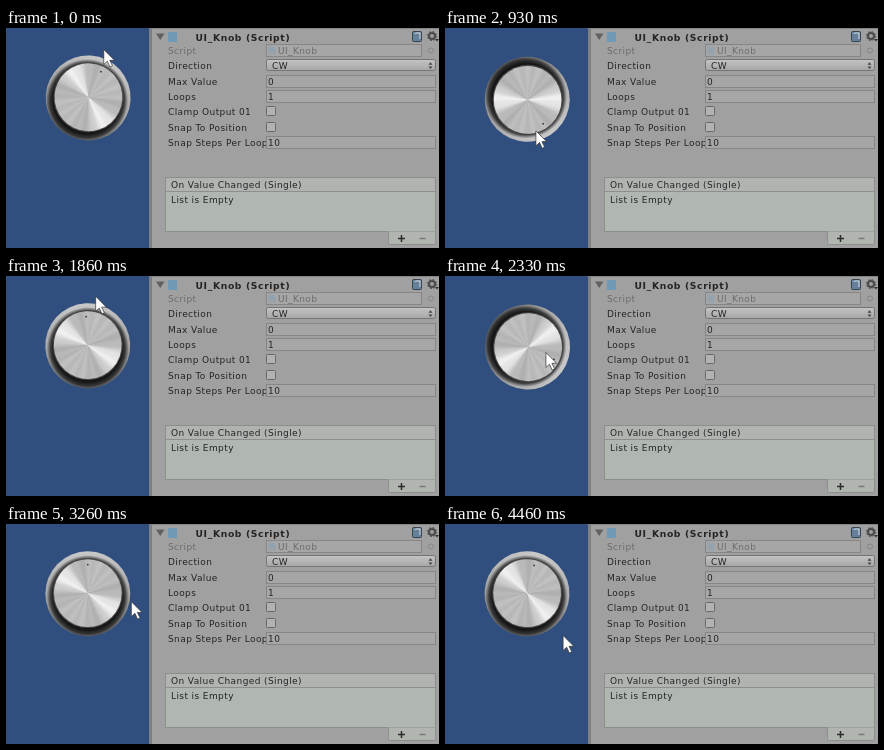
Write an HTML page with a canvas that moves like this. It is 433 px wide and 220 px high and loops after 4530 ms.

```html
<!DOCTYPE html>
<html lang="en">
<head>
<meta charset="utf-8">
<title>UI_Knob</title>
<style>
html, body { margin: 0; width: 433px; height: 220px; overflow: hidden; background: #304f7f; }
svg, canvas { position: absolute; left: 0; top: 0; display: block; }
text { font: 9px "DejaVu Sans", sans-serif; letter-spacing: .4px; fill: #242424; }
.title { font-size: 9.2px; font-weight: bold; letter-spacing: .65px; }
.dim { fill: #6c6c6c; }
.field { fill: #a6a6a6; stroke: #868686; }
.check { fill: #b2b2b2; stroke: #686868; }
.list { fill: #b0b7b0; stroke: #8c908c; }
.head { fill: #b1b3b1; stroke: #8c908c; }
</style>
</head>
<body>
<svg width="433" height="220" viewBox="0 0 433 220">
  <defs>
    <linearGradient id="drop" x2="0" y2="1">
      <stop stop-color="#c4c4c4"/><stop offset="1" stop-color="#a6a6a6"/>
    </linearGradient>
    <clipPath id="labels"><path d="M146 0H260V220H146z"/></clipPath>
  </defs>
  <rect x="143" width="290" height="220" fill="#a0a0a0"/>
  <rect x="143" width="3" height="220" fill="#808080"/>
  <path d="M146 .5H433" stroke="#868686"/>

  <path d="M150 5.500h8.500l-4.300 6.500z" fill="#606060"/>
  <rect x="162" y="4" width="9" height="10" fill="#6f9ab5"/>
  <text class="title" x="189.500" y="13">UI_Knob (Script)</text>
  <rect x="406.500" y="3.500" width="9" height="10" rx="1" fill="#67809a" stroke="#35424f"/>
  <path d="M409 6q0-1 1-1h4v6" fill="none" stroke="#d5dade"/>
  <circle cx="426" cy="8" r="3" fill="none" stroke="#4a4a4a" stroke-width="2"/>
  <circle cx="426" cy="8" r="4.500" fill="none" stroke="#4a4a4a" stroke-dasharray="1.800 1.734"/>
  <path d="M429 11h4l-2 2.500z" fill="#333"/>

  <g id="rows"></g>
  <circle cx="425" cy="22.500" r="2.500" fill="none" stroke="#868686"/>
  <path d="M422.500 36.800h4l-2-2.500zM422.500 38.500h4l-2 2.500z" fill="#444"/>

  <rect class="list" x="159.500" y="149.500" width="270" height="54"/>
  <rect class="head" x="159.500" y="149.500" width="270" height="14"/>
  <text x="165" y="160">On Value Changed (Single)</text>
  <text x="165" y="175">List is Empty</text>
  <path d="M382.500 203.500v11q0 2 2 2h43q2 0 2-2v-11" fill="#b0b5b0" stroke="#8c908c"/>
  <path d="M392 210.500h7m-3.500-3.500v7" stroke="#2c2c2c" stroke-width="1.500"/>
  <path d="M413.500 210.500h6" stroke="#777" stroke-width="1.500"/>
</svg>
<canvas id="stage" width="433" height="220"></canvas>
<script>
const ctx = document.getElementById("stage").getContext("2d");
const LOOP = 4530, STEPS = 68, RAD = Math.PI / 180;

// Inspector rows: label, kind, value
const rows = [
  ["Script", "object", "UI_Knob"], ["Direction", "menu", "CW"],
  ["Max Value", "field", "0"], ["Loops", "field", "1"],
  ["Clamp Output 01", "check"], ["Snap To Position", "check"],
  ["Snap Steps Per Loop", "field", "10"]
];

const box = (y, w, h, look) => `<rect x="260.5" y="${y}" width="${w}" height="${h}" ${look}/>`;
const controls = {
  object: y => box(y - 9.5, 155, 12, 'class="field"') +
    `<rect x="262.5" y="${y - 7.5}" width="7" height="8" fill="#94a3ad"/>`,
  menu: y => box(y - 9.5, 169, 11, 'rx="2" fill="url(#drop)" stroke="#747474"'),
  field: y => box(y - 9.5, 169, 12, 'class="field"'),
  check: y => box(y - 8.5, 9, 9, 'rx="1" class="check"')
};
const indent = { object: 272, menu: 266, field: 262 };

document.getElementById("rows").innerHTML = rows.map(([label, kind, value], i) => {
  const y = Math.round(26 + i * 15.35), dim = kind === "object" ? 'class="dim"' : "";
  const text = value ? `<text ${dim} x="${indent[kind]}" y="${y}">${value}</text>` : "";
  return `<text ${dim} clip-path="url(#labels)" x="162" y="${y}">${label}</text>` +
    controls[kind](y) + text;
}).join("");

// Stops of the drag: arrive and leave step, knob angle, pointer angle and radius
const stops = [
  [0, 0, 26, 18, 51], [5, 8, 77, 108, 34], [23, 23, 252, 250, 34],
  [31, 33, 420, 440, 60], [35, 35, 475, 469, 20], [43, 43, 695, 779, 56],
  [49, 52, 720, 820, 44], [56, 57, 746, 937, 67], [61, 65, 752, 985, 68],
  [67, 67, 734, 859, 55]
];

function poseAt(step) {
  const i = Math.max(1, stops.findIndex(s => s[1] >= step));
  const a = stops[i - 1], b = stops[i];
  const u = Math.min(1, (step - a[1]) / (b[0] - a[1]));
  return a.map((v, j) => v + (b[j] - v) * u).slice(2);
}

function disc(y, r, fill) {
  ctx.beginPath();
  ctx.arc(0, y, r, 0, 2 * Math.PI);
  ctx.fillStyle = fill;
  ctx.fill();
}

function shade(gradient, ...colors) {
  colors.forEach((c, i) => gradient.addColorStop(i / (colors.length - 1), c));
  return gradient;
}

const rim = shade(ctx.createLinearGradient(0, -43, 0, 43), "#c8c8c8", "#a4a4a4", "#646464");
const shadow = shade(ctx.createRadialGradient(0, 1.5, 34, 0, 1.5, 41),
  "rgba(22,22,22,1)", "rgba(30,30,30,.75)", "rgba(40,40,40,0)");

// Brushed metal: two broad opposite highlights plus finer streaks
const metal = ctx.createConicGradient(33 * RAD, 0, -1.5);
for (let i = 0; i <= 120; i++) {
  const a = i * 3 * RAD;
  const glow = 60 * Math.cos(a) ** 6 + 24 * Math.sin(a) ** 8;
  const streak = 7 * Math.cos(6 * a) + 5 * Math.sin(17 * a);
  const v = Math.round(170 + glow + streak);
  metal.addColorStop(i / 120, `rgb(${v},${v},${v})`);
}

function drawKnob(angle) {
  ctx.save();
  ctx.translate(81.8, 70.6);
  ctx.rotate(angle * RAD);
  disc(-0.8, 42.5, rim);
  disc(0.5, 41, shadow);
  disc(-1.5, 35, "#484848");
  disc(-1.5, 33.9, metal);
  disc(-30, 0.9, "#343434");
  ctx.restore();
}

const arrow = new Path2D("M0 0V15L3.600 11.700 6.300 17.500 8.700 16.300 6 10.800H10.700Z");

function drawPointer(angle, radius) {
  ctx.save();
  ctx.translate(82 + Math.sin(angle * RAD) * radius, 70 - Math.cos(angle * RAD) * radius);
  ctx.fillStyle = "#fff";
  ctx.fill(arrow);
  ctx.strokeStyle = "#333";
  ctx.lineWidth = 0.7;
  ctx.stroke(arrow);
  ctx.restore();
}

// The picture advances 15 times a second, on whole hundredths
function draw(now) {
  const tick = Math.floor((now % LOOP) / 10);
  const step = Math.min(STEPS - 1, Math.ceil((tick + 1) * 0.15 - 1e-9) - 1);
  const [knob, angle, radius] = poseAt(step);
  ctx.clearRect(0, 0, 433, 220);
  drawKnob(knob);
  drawPointer(angle, radius);
}

const start = performance.now();
function run() {
  draw(performance.now() - start);
  requestAnimationFrame(run);
}
run();
</script>
</body>
</html>
```
